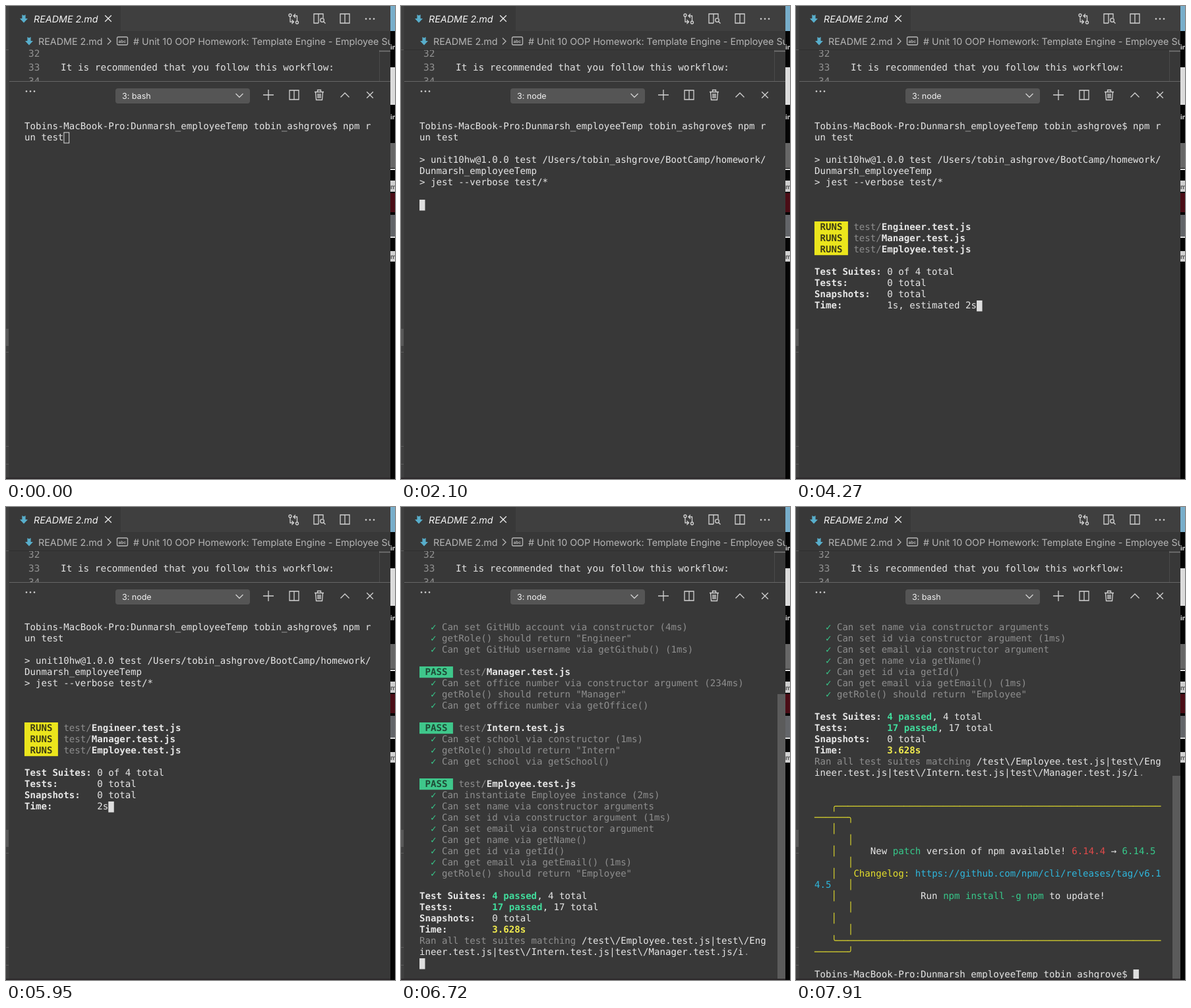
Recreate the animation shown at these times as an HTML page. Size 590x718 px, loop 7980 ms.

```html
<!DOCTYPE html>
<html lang="en">
<head>
<meta charset="utf-8">
<title>Terminal test run</title>
<style>
  html, body { margin: 0; width: 100%; height: 100%; overflow: hidden; background: #383838; }
  svg { display: block; width: 590px; height: 718px; }
  text { white-space: pre; text-rendering: geometricPrecision; }
  .term text { font: 14.09px "DejaVu Sans Mono", monospace; fill: #e6e6e6; }
  .term .bold, .term .ok, .term .warn, .term .pass, .term .runs { font-weight: bold; }
  .term .dim { fill: #8e8e8e; }
  .term .ok { fill: #41dc9c; }
  .term .green { fill: #37c98b; }
  .term .warn { fill: #f2ec4e; }
  .term .line { fill: #e4de2c; }
  .term .cyan { fill: #2fb6dc; }
  .term .red { fill: #e04a4a; }
  .term .pass { fill: #1f4a36; }
  .term .runs { fill: #3d3c14; }
  .code { font: 14.36px "DejaVu Sans Mono", monospace; fill: #e2e2e2; }
  .num { fill: #929292; }
  .ui { font: 14.3px Inter, sans-serif; fill: #b6b6b6; }
  .icon { fill: none; stroke: #d2d2d2; stroke-width: 1.3; }
  .dots { fill: #d2d2d2; }
</style>
</head>
<body>
<svg viewBox="0 0 590 718" xmlns="http://www.w3.org/2000/svg">
  <defs>
    <clipPath id="editor"><rect x="5" y="66" width="578" height="48"/></clipPath>
    <clipPath id="crumbs"><rect x="5" y="39" width="578" height="28"/></clipPath>
    <path id="arrow" d="M-2.6-6 0-4.6 2.6-6V0H6L0 6.6-6 0h3.4z" fill="#58aecb"/>
    <path id="split" d="M-7-7H7V7H-7zM0-7V7"/>
    <path id="cross" d="M-4.8-4.8 4.8 4.8M4.8-4.8-4.8 4.8"/>
    <g id="dots"><circle cx="-6" r="1.3"/><circle r="1.3"/><circle cx="6" r="1.3"/></g>
  </defs>

  <rect width="590" height="718" fill="#383838"/>
  <rect x="174" width="409" height="38" fill="#3f3f3f"/>

  <!-- sidebar edge -->
  <rect width="4.5" height="718" fill="#404040"/>
  <rect y="490" width="4" height="26" fill="#585858"/>
  <path d="M0 66.5h4M0 525.5h4M0 668.5h4M0 695.5h4" stroke="#5c5c5c"/>

  <!-- tab and breadcrumbs -->
  <use href="#arrow" x="27" y="19"/>
  <text class="ui" x="42" y="24.5" style="fill:#f4f4f4;font-style:italic">README 2.md</text>
  <g clip-path="url(#crumbs)">
    <use href="#arrow" x="35" y="53"/>
    <text class="ui" x="49" y="58.5">README 2.md</text>
    <text class="ui" x="193" y="58.5"># Unit 10 OOP Homework: Template Engine - Employee Summary</text>
    <text class="ui" x="170.5" y="55.5" style="font-size:6.5px;font-weight:700">abc</text>
  </g>
  <g class="icon">
    <use href="#cross" x="155" y="19" stroke="#eee"/>
    <path d="M154 48.500l5 5-5 5" stroke="#b6b6b6"/>
    <rect x="168.500" y="47" width="16" height="12" rx="2" stroke="#b6b6b6"/>
    <circle cx="431" cy="14" r="2"/><circle cx="441.500" cy="25" r="2"/>
    <path d="M431 16v8h5m-2.500-3 3 3-3 3M441.500 23v-8h-5m2.500-3-3 3 3 3"/>
    <path d="M474 26h-7V12h14v6M474 12v14"/>
    <circle cx="479.500" cy="21.500" r="2.800"/><path d="M481.500 23.500l3 3"/>
    <use href="#split" x="514" y="19"/>
  </g>
  <use class="dots" href="#dots" x="552" y="19.500"/>

  <!-- editor sliver -->
  <g clip-path="url(#editor)">
    <g class="code">
      <text class="num" x="34" y="77">32</text>
      <text class="num" x="34" y="98">33</text>
      <text class="num" x="34" y="119">34</text>
      <text x="83" y="98">It is recommended that you follow this workflow:</text>
    </g>
    <path d="M566.500 67v47" stroke="#4a4a4a"/>
    <path d="M566 68.500h17" stroke="#7a7a7a" stroke-width="1.500"/>
  </g>
  <path id="shade" d="M5 66.500h561" stroke="#2f2f2f"/>
  <path d="M5 114.500h578" stroke="#666"/>

  <!-- panel toolbar -->
  <use class="dots" href="#dots" x="37" y="129.500"/>
  <rect x="166" y="125" width="204" height="23" rx="4" fill="#555"/>
  <text id="shell" class="ui" x="176" y="141" style="fill:#f0f0f0;font-size:12.5px"></text>
  <g class="icon">
    <path d="M348.500 133l5.500 5.500 5.500-5.500"/>
    <path d="M390 135h16M398 127v16"/>
    <use href="#split" x="437" y="135"/>
    <path d="M468 130.500h14M472.500 130v-2.500h5v2.500M469.500 131l1 11.500h9l1-11.500M473 133v7M475 133v7M477 133v7"/>
    <path d="M507.500 138.500l6.500-6.500 6.500 6.500"/>
    <use href="#cross" x="552" y="135"/>
  </g>

  <g id="term" class="term"></g>
  <rect id="bar" x="571" width="12" fill="#5b5b5b"/>
  <rect id="hollow" x="87.900" y="192" width="7.800" height="16" fill="none" stroke="#ddd"/>

  <path id="mouse" d="M-4-8.500q4 0 4 3 0-3 4-3M0-6V6M-4 8.500q4 0 4-3 0 3 4 3M-2 1H2" fill="none" stroke="#f2f2f2" stroke-width="1.400"/>

  <g id="behind"></g>
  <rect y="716" width="583" height="2" fill="#2c282a"/>
</svg>

<script>
const NS = 'http://www.w3.org/2000/svg';
const LOOP = 7980, X0 = 28, Y0 = 187, CW = 8.484, LH = 17;
const $ = id => document.getElementById(id);

function add(parent, tag, attrs, text) {
  const el = document.createElementNS(NS, tag);
  for (const k in attrs) el.setAttribute(k, attrs[k]);
  if (text) el.textContent = text;
  parent.appendChild(el);
  return el;
}

// Windows peeking out on the right: y, height, colour
const strip = [
  [0, 718, '#050505'], [0, 38, '#78aecb'], [93, 57, '#dcdcdc'],
  [208, 38, '#676767'], [247, 2, '#e0e0e0'], [265, 17, '#cfcfcf'],
  [284, 29, '#4b0d16'], [317, 33, '#636569'], [350, 2, '#e0e0e0'],
  [372, 16, '#d2d2d2']
];
for (const [y, height, fill] of strip) add($('behind'), 'rect', { x: 583, y, width: 7, height, fill });
for (const [y, word, fill] of [[66, 'in', '#ddd'], [172, 'in', '#ddd'], [278, 'm', '#555'], [384, 'm', '#555']])
  add($('behind'), 'text', { x: 583, y, fill, style: 'font:700 10px Inter,sans-serif' }, word);

// Markup: ^ plus one letter starts a styled run
const STYLES = {
  w: '', b: 'bold', d: 'dim', g: 'ok', n: 'green', y: 'warn',
  l: 'line', c: 'cyan', r: 'red', P: 'pass', R: 'runs'
};
const BADGE = { P: '#3fc78b', R: '#ebe51c' };

function drawLine(g, line, row) {
  const y = Y0 + row * LH;
  let col = 0;
  const runs = line[0] === '^' ? line : '^w' + line;
  for (const [, key, text] of runs.matchAll(/\^(.)([^^]*)/g)) {
    const x = X0 + col * CW;
    if (BADGE[key]) add(g, 'rect', { x, y: y - 13, width: text.length * CW, height: LH + .2, fill: BADGE[key] });
    if (text.trim()) add(g, 'text', { x, y, class: STYLES[key] }, text);
    col += text.length;
  }
  return col;
}

const prompt = 'Tobins-MacBook-Pro:Dunmarsh_employeeTemp tobin_ashgrove$ ';
const typed = [prompt + 'npm r', 'un test'];
const head = [
  ...typed, '',
  '> unit10hw@1.0.0 test /Users/tobin_ashgrove/BootCamp/homework/',
  'Dunmarsh_employeeTemp', '> jest --verbose test/*', ''
];

const file = (badge, name) => `${badge}^w ^dtest/^b${name}.test.js`;
const runs = (...names) => names.map(n => file('^R RUNS ', n));
const pass = (name, ...tests) => [
  file('^P PASS ', name),
  ...tests.map(t => `^w  ^n✓^d ${t}`),
  ''
];
const totals = (suites, tests, time) => [
  '^bTest Suites: ' + suites, '^bTests:       ' + tests,
  '^bSnapshots:   ^w0 total', '^bTime:        ' + time
];
const waiting = (names, time) =>
  [...head, '', ...(names.length ? ['', ...runs(...names)] : ['']), '', ...totals('^w0 of 4 total', '^w0 total', time)];

const engineer = pass('Engineer', 'Can set GitHUb account via constructor (4ms)',
  'getRole() should return "Engineer"', 'Can get GitHub username via getGithub() (1ms)');
const manager = pass('Manager', 'Can set office number via constructor argument (234ms)',
  'getRole() should return "Manager"', 'Can get office number via getOffice()');
const intern = pass('Intern', 'Can set school via constructor (1ms)',
  'getRole() should return "Intern"', 'Can get school via getSchool()');
const employee = pass('Employee', 'Can instantiate Employee instance (2ms)',
  'Can set name via constructor arguments', 'Can set id via constructor argument (1ms)',
  'Can set email via constructor argument', 'Can get name via getName()', 'Can get id via getId()',
  'Can get email via getEmail() (1ms)', 'getRole() should return "Employee"');

const half = [
  ...head, ...engineer, ...manager, '', ...runs('Employee', 'Intern'), '',
  ...totals('^g2 passed^w, 2 of 4 total', '^g6 passed^w, 6 total', '^y3s')
];
const report = [
  ...head, ...engineer, ...manager, ...intern, ...employee,
  ...totals('^g4 passed^w, 4 total', '^g17 passed^w, 17 total', '^y3.628s'),
  '^dRan all test suites matching ^w/test\\/Employee.test.js|test\\/Eng',
  '^wineer.test.js|test\\/Intern.test.js|test\\/Manager.test.js/i^d.', ''
];

// The notice is wider than the terminal, so its frame wraps
const rule = n => '─'.repeat(n);
const left = '^l   │', right = '^l      │';
const notice = [
  '', '^l   ╭' + rule(58), '^l' + rule(6) + '╮', left, right,
  left + '^w      New ^npatch^w version of npm available! ^r6.14.4^w → ^n6.14.5', right,
  left + '^w   ^lChangelog:^w ^chttps://github.com/npm/cli/releases/tag/v6.1',
  '^c4.5^l   │',
  left + '^w               Run ^nnpm install -g npm^w to update!',
  right, left, right, '^l   ╰' + rule(58), '^l' + rule(6) + '╯', '', prompt
];

const three = ['Engineer', 'Manager', 'Employee'];
// start, lines, first visible row, scrollbar top
const scenes = [
  [0, typed],
  [1260, [...typed, '']],
  [2030, [...head, '']],
  [2800, waiting([], '^w0s, estimated 2s')],
  [3010, waiting(['Engineer'], '^w0s, estimated 2s')],
  [3080, waiting(three, '^w0s, estimated 2s')],
  [4130, waiting(three, '^w1s, estimated 2s')],
  [5180, waiting(three, '^w2s')],
  [6160, waiting(three, '^y3s')],
  [6370, half],
  [6650, report, 8, 284],
  [6860, [...report, ...notice], 24, 408]
].map(([start, lines, top = 0, bar = 718]) => {
  const g = add($('term'), 'g', { display: 'none' });
  let col = 0;
  lines.slice(top).forEach((line, row) => col = drawLine(g, line, row));
  const cursor = add(g, 'rect', {
    x: X0 + col * CW, y: Y0 + (lines.length - top - 1) * LH - 12,
    width: CW, height: 16.5, fill: '#dedede'
  });
  return { start, g, cursor, bar };
});

const FOCUS = 770, ENTER = 1260;
const show = (el, on) => el.setAttribute('display', on ? 'inline' : 'none');

function draw(t) {
  const now = scenes.filter(s => s.start <= t).pop();
  for (const s of scenes) show(s.g, s === now);
  show(now.cursor, t >= FOCUS);
  show($('hollow'), t < FOCUS);
  $('bar').setAttribute('y', now.bar);
  $('bar').setAttribute('height', 718 - now.bar);
  $('shell').textContent = t >= 1540 && t < 7070 ? '3: node' : '3: bash';
  show($('shade'), t >= 1540);

  // pointer glides in, rests, and hides on the key press
  const p = Math.min(1, Math.max(0, (t - 280) / 420));
  const rest = (1 - p) ** 3;
  $('mouse').setAttribute('transform', `translate(${116 + 484 * rest} ${208 + 300 * rest})`);
  show($('mouse'), t >= 280 && t < ENTER);
}

const t0 = performance.now();
function tick() {
  draw((performance.now() - t0) % LOOP);
  requestAnimationFrame(tick);
}
tick();
</script>
</body>
</html>
```
